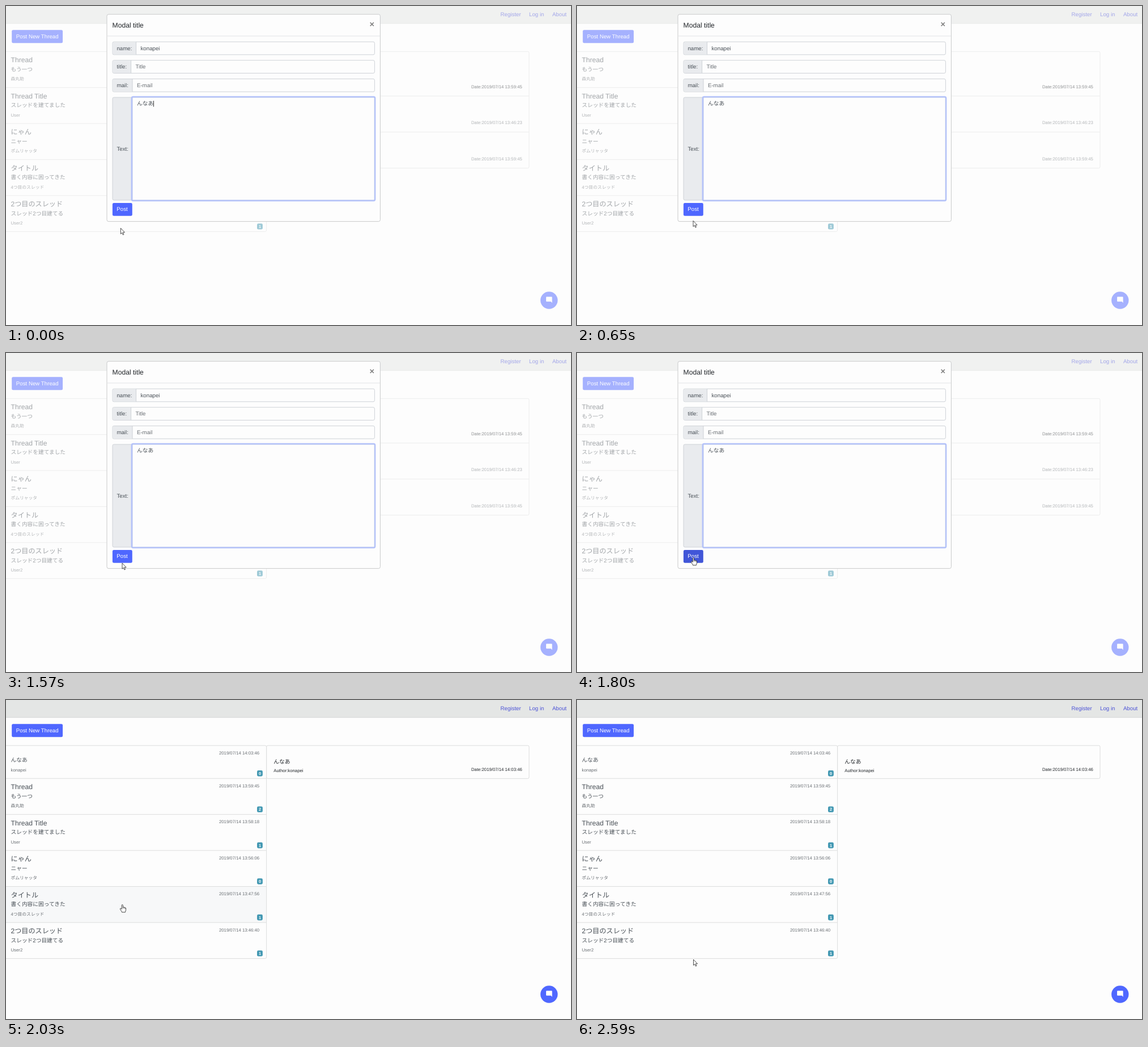
These frames come from a looping animation (997 px wide and 562 px high, 3.61 s). An HTML page:

```html
<!DOCTYPE html>
<html lang="ja">
<head>
<meta charset="utf-8">
<title>Post a thread</title>
<style>
html, body { margin: 0; width: 100%; height: 100%; overflow: hidden; background: #fdfdfd; }
svg { display: block; width: 997px; height: 562px; }
text { font-family: "Liberation Sans", Arial, "Noto Sans CJK JP", "Noto Sans CJK", sans-serif; font-size: 9.71px; fill: #495057; text-rendering: geometricPrecision; white-space: pre; }
.big { font-size: 12.14px; }
.small { font-size: 7.77px; }
.muted { fill: #6a6f74; }
.dark { fill: #212529; }
.nav { fill: #4c53d6; }
.white { fill: #fff; }
.badge { font-size: 7.28px; font-weight: bold; fill: #fff; }
.close { font-size: 14.6px; font-weight: bold; fill: #7f7f7f; }
</style>
</head>
<body>
<svg id="stage" viewBox="0 0 997 562" xmlns="http://www.w3.org/2000/svg"></svg>
<script>
const LOOP = 3610, POSTED = 2030;
const ROW = 63.45, TOP = 80.2, BLUE = '#4f67ff', LINE = '#dcdddd';
const NAME = 'konapei', WORDS = 'んなあ';

const threads = [
  ['Thread', 'もう一つ', '森丸助', '13:59:45', 2],
  ['Thread Title', 'スレッドを建てました', 'User', '13:58:18', 1],
  ['にゃん', 'ニャー', 'ポムリャッタ', '13:56:06', 0],
  ['タイトル', '書く内容に困ってきた', '4つ目のスレッド', '13:47:56', 1],
  ['2つ目のスレッド', 'スレッド2つ目建てる', 'User2', '13:46:40', 1]
];
const newThread = ['', WORDS, NAME, '14:03:46', 0];
const DAY = '2019/07/14 ';

const text = (x, y, s, cls = '', anchor = 'start') =>
  `<text x="${x}" y="${y}" class="${cls}" text-anchor="${anchor}">${s}</text>`;
const rect = (x, y, w, h, fill, stroke = 'none', rx = 0, more = '') =>
  `<rect x="${x}" y="${y}" width="${w}" height="${h}" rx="${rx}" fill="${fill}" stroke="${stroke}" ${more}/>`;
const path = (d, stroke, fill = 'none', more = '') =>
  `<path d="${d}" stroke="${stroke}" fill="${fill}" ${more}/>`;

function threadRow([title, body, user, time, count], y) {
  const s = title ? y : y - 5.4;
  return text(8.5, s + 19, title, 'big') + text(8.5, s + 34.6, body) +
    text(8.5, s + 51.2, user, 'small muted') +
    text(447.2, y + 15.7, DAY + time, 'small muted', 'end') +
    rect(443, s + 49.2, 9.9, 10.4, '#4499b3', 'none', 2.4) +
    text(447.95, s + 57, count, 'badge', 'middle');
}

function list(rows, hoverIds) {
  let y = TOP, out = '', lines = '';
  rows.forEach((r, i) => {
    const h = r[0] ? ROW : 58;
    if (hoverIds) out += rect(0, y, 459.5, h, '#f7f8f9', 'none', 0, `id="row${i}"`);
    out += threadRow(r, y);
    y += h;
    if (i < rows.length - 1) lines += `M0 ${y}H459.5`;
  });
  return out + path(lines, LINE) +
    rect(-10, TOP, 469.6, y - TOP, 'none', LINE, 2.4);
}

function shell() {
  return rect(0, 0, 997, 30.5, '#e4e6e5') + path('M0 30.8H997', '#d0d2d2') +
    text(872.6, 17.5, 'Register', 'nav') + text(923, 17.5, 'Log in', 'nav') +
    text(963.9, 17.5, 'About', 'nav') +
    rect(10.2, 42.2, 89.9, 23.1, BLUE, 'none', 2.4) +
    text(17.8, 57, 'Post New Thread', 'white') +
    `<circle cx="958.3" cy="518.5" r="15.2" fill="${BLUE}"/>` +
    path('M22 4q0-2-2-2H4Q2 2 2 4v12q0 2 2 2h14l4 4z', 'none', '#fff',
      'transform="translate(952 511.3) scale(.53)"');
}

const dateLine = (y, time, cls) => text(910.8, y, 'Date:' + DAY + time, 'small ' + cls, 'end');

function before() {
  return shell() + list(threads, false) +
    rect(459.6, TOP, 463.4, 205.4, 'none', LINE, 2.4) +
    path('M460 158.6H923M460 222.1H923', LINE) +
    dateLine(145, '13:59:45', 'dark') + dateLine(208.4, '13:46:23', 'muted') +
    dateLine(271.8, '13:59:45', 'muted');
}

function after() {
  return shell() + list([newThread, ...threads], true) +
    rect(459.6, TOP, 463.4, 58.2, 'none', LINE, 2.4) +
    text(472.3, 112.4, WORDS, 'dark') +
    text(472.3, 126.9, 'Author:' + NAME, 'small dark') + dateLine(125, '14:03:46', 'dark');
}

function field(y, split, label, value, cls) {
  return rect(188, y, 462.4, 22.7, '#fdfdfd', '#ced2d7', 2.4) +
    path(`M${split} ${y + .5}H190.4Q188.5 ${y + .5} 188.5 ${y + 2.4}V${y + 20.3}Q188.5 ${y + 22.2} 190.4 ${y + 22.2}H${split}z`, 'none', '#e9ebee') +
    path(`M${split} ${y}v22.7`, '#ced2d7') +
    text(195.4, y + 14.6, label) + text(split + 7.9, y + 14.6, value, cls);
}

function modal() {
  return rect(178, 14.7, 482.4, 364.9, '#fdfdfd', '#c9cacb', 3) +
    path('M178.5 52.9H660', '#e2e4e6') +
    text(187.6, 38, 'Modal title', 'big dark') + text(645.7, 36.6, '×', 'close', 'middle') +
    field(63.1, 229.6, 'name:', NAME) +
    field(95.7, 220.6, 'title:', 'Title', 'muted') +
    field(128.4, 223, 'mail:', 'E-mail', 'muted') +
    rect(188, 161, 36, 181, '#e9ebee', '#ced2d7', 2.4) + text(195.4, 254.6, 'Text:') +
    rect(221.9, 160.1, 429.2, 182.8, 'none', '#b5c3fb', 2.4, 'id="areaRing" stroke-width="2.6"') +
    rect(223, 161, 427.2, 181, '#fdfdfd', '#b3c1ee', 1.5) +
    text(231, 175.4, WORDS) +
    rect(260, 167, 1, 10.4, '#333', 'none', 0, 'id="caret"') +
    rect(187.1, 346.3, 36.5, 24.3, 'none', '#a7b3fe', 3.2, 'id="btnRing" stroke-width="2"') +
    rect(187.9, 347.1, 34.9, 22.7, BLUE, 'none', 2.4, 'id="btn"') +
    text(195.3, 361.4, 'Post', 'white');
}

function cursors() {
  return path('M0 0V10.2L2.3 8.1 3.9 11.8 5.5 11.1 3.9 7.5H7.1Z', '#222', '#fff',
      'id="arrow" stroke-width=".8"') +
    `<g id="hand">${path('M-1.1.9C-1.1-.5 1.1-.5 1.1.9V4.6C1.3 3.9 3 3.9 3.1 4.8 3.4 4.2 4.8 4.5 4.9 5.4 5.4 5 6.2 5.4 6.2 6.3V9C6.2 11 5.1 11.5 5.1 13.2H-.8C-.8 11.5-3.8 9-3.9 7.2-3.9 6-2.3 6-1.1 7.8Z',
      '#222', '#fff', 'stroke-width=".85"')}${path('M1.1 4.6V6.6M3.1 4.8V6.8M4.9 5.4V7', '#222', 'none', 'stroke-width=".7"')}</g>`;
}

document.getElementById('stage').innerHTML = rect(0, 0, 997, 562, '#fdfdfd') +
  `<g id="before"><g opacity=".5">${before()}</g>${modal()}</g><g id="after">${after()}</g>` + cursors();

const $ = id => document.getElementById(id);
const show = (id, on) => $(id).setAttribute('display', on ? 'inline' : 'none');
const ramp = (t, a, b) => Math.min(1, Math.max(0, (t - a) / (b - a)));
const mix = (a, b, k) => `rgb(${a.map((v, i) => Math.round(v + (b[i] - v) * k))})`;

// time, x, y of the pointer tip
const track = [
  [40, 202.4, 391.4], [160, 197.5, 389.5], [260, 195.6, 386], [400, 200, 381.5],
  [550, 205, 379], [600, 205, 379], [650, 205, 378.4], [1010, 205, 378.4],
  [1290, 205, 371.3], [1520, 205, 371.3], [1570, 205, 370.2], [1740, 205.3, 360.7],
  [2130, 205.3, 360.7], [2590, 205.5, 457.2]
];

function pointer(t) {
  const i = track.findIndex(k => k[0] > t);
  if (i === 0) return track[0].slice(1);
  if (i < 0) return track[track.length - 1].slice(1);
  const a = track[i - 1], b = track[i], k = ramp(t, a[0], b[0]);
  return [1, 2].map(n => a[n] + (b[n] - a[n]) * k);
}

function draw(t) {
  const posted = t >= POSTED, [x, y] = pointer(t);
  show('before', !posted);
  show('after', posted);
  show('caret', t < 270 || (t >= 800 && t < 1290));

  const hover = ramp(t, 1600, 1750), press = ramp(t, 1850, 1980);
  $('btn').setAttribute('fill', press
    ? mix([65, 86, 216], [60, 81, 205], press)
    : mix([79, 103, 255], [65, 86, 216], hover));
  $('areaRing').setAttribute('opacity', 1 - press);
  $('btnRing').setAttribute('opacity', press);

  const onRow4 = y < 392, onRow5 = !onRow4 && y < 455.6;
  for (let i = 0; i < 6; i++) show('row' + i, (i === 4 && onRow4) || (i === 5 && onRow5));

  const hand = posted ? y < 455.6 : y < 369.8;
  show('hand', hand);
  show('arrow', !hand);
  $(hand ? 'hand' : 'arrow').setAttribute('transform', `translate(${x} ${y})`);
}

const start = performance.now();
function tick() {
  draw((performance.now() - start) % LOOP);
  requestAnimationFrame(tick);
}
tick();
</script>
</body>
</html>
```
